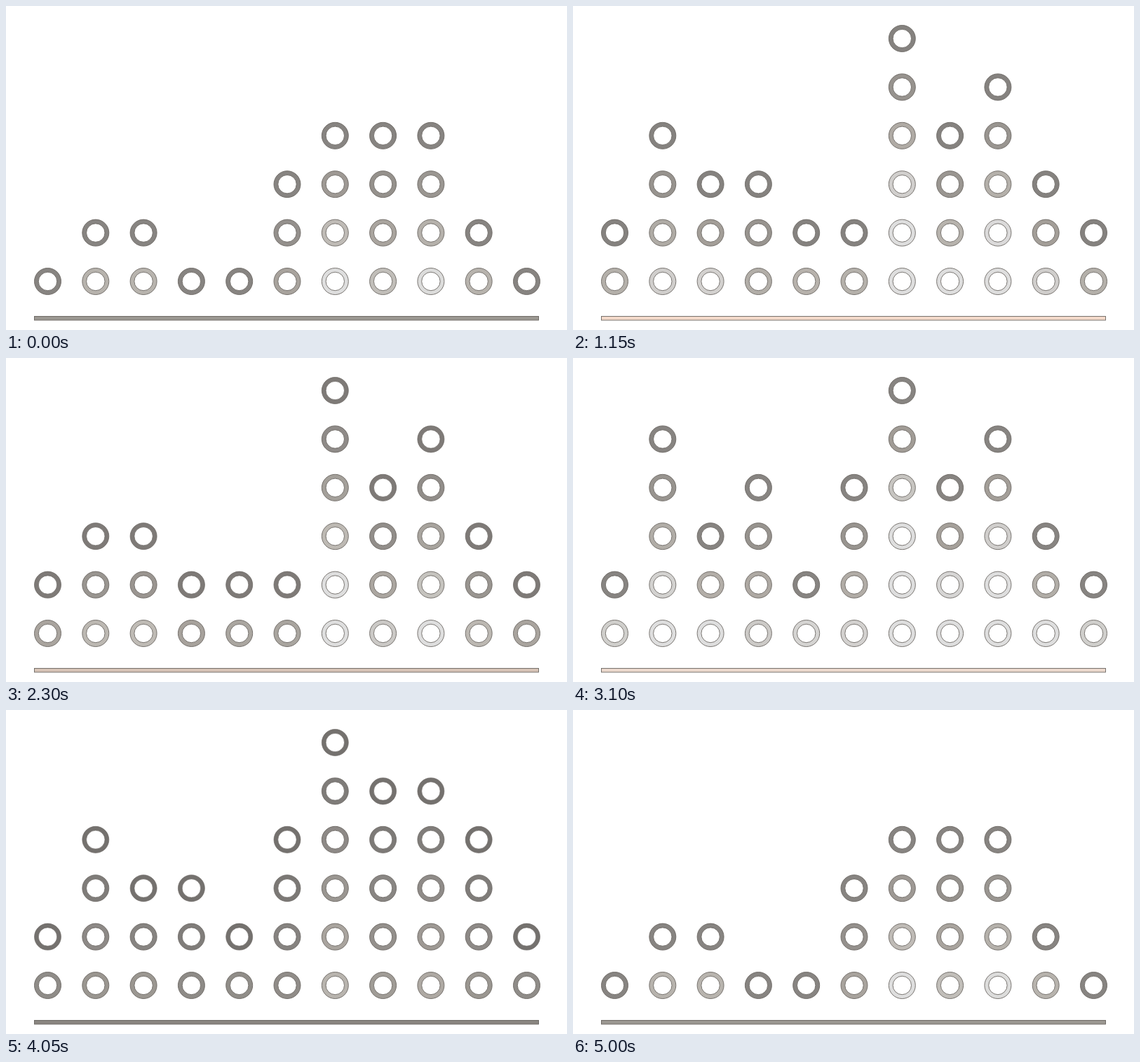
Recreate the animation shown at these times as an HTML page with a canvas. Size 800 by 463 pixels, loop 5.05 s.

```html
<!DOCTYPE html>
<html lang="en">
<head>
<meta charset="utf-8">
<title>Ring meter</title>
<style>
  html, body { margin: 0; width: 100%; height: 100%; overflow: hidden; background: #fff; }
  canvas { display: block; }
</style>
</head>
<body>
<canvas id="stage" width="800" height="463"></canvas>
<script>
const ctx = document.getElementById("stage").getContext("2d");
const LOOP = 5050, STEP = 50, RESET = 5000;
const OUTLINE = "#6b6763";

// Evenly spaced colour stops, from spent to fully lit.
const RING_RAMP = [[97, 93, 90], [135, 132, 129], [162, 157, 151], [188, 184, 178], [222, 222, 222]];
const BAR_RAMP = [[120, 116, 112], [156, 152, 146], [215, 196, 183], [236, 217, 205], [252, 219, 198]];

// Resting spectrum, in rings per column.
const SPECTRUM = [2, 3, 3.1, 1.9, 2.1, 2.05, 5.9, 3.6, 4.9, 3, 2];

// swell shifts every column; the kick is a bump around centre that lifts odd
// columns and presses even ones. tone is the level of the top rings, glow the
// gain towards the bottom, bar the level of the base line.
const moods = [
  { at: 0,     swell: -0.9, centre: 5.5, width: 2.1, kick: 1.7,  tone: 1,    glow: 0.6,  bar: 1 },
  { at: 650,   swell: 0,    centre: 1.5, width: 3,   kick: 2,    tone: 1,    glow: 0.9,  bar: 3 },
  { at: 1700,  swell: 0,    centre: 1.5, width: 3,   kick: 0,    tone: 0.9,  glow: 0.85, bar: 4 },
  { at: 2300,  swell: 0,    centre: 3,   width: 3,   kick: 0,    tone: 0.75, glow: 0.75, bar: 2 },
  { at: 3100,  swell: 0.25, centre: 3,   width: 3,   kick: 2.3,  tone: 1,    glow: 1.3,  bar: 3 },
  { at: 4050,  swell: 0.25, centre: 5,   width: 6,   kick: 1.45, tone: 0.5,  glow: 0.4,  bar: 0.5 },
  { at: RESET, swell: 0.25, centre: 5,   width: 6,   kick: 1.45, tone: 0.2,  glow: 0.15, bar: 0 }
];

const mix = (a, b, p) => a + (b - a) * p;

function shade(ramp, level) {
  const x = Math.min(Math.max(level, 0), ramp.length - 1);
  const i = Math.min(Math.floor(x), ramp.length - 2);
  return `rgb(${ramp[i].map((v, k) => Math.round(mix(v, ramp[i + 1][k], x - i)))})`;
}

function moodAt(time) {
  const i = moods.findIndex(m => m.at > time);
  const a = moods[i - 1], b = moods[i];
  const p = (time - a.at) / (b.at - a.at);
  return Object.fromEntries(Object.keys(a).map(key => [key, mix(a[key], b[key], p)]));
}

function ringCount(col, mood) {
  const bump = Math.exp(-(((col - mood.centre) / mood.width) ** 2));
  const side = col % 2 ? 1 : -0.35;
  return Math.round(SPECTRUM[col] + mood.swell + mood.kick * bump * side);
}

function drawRing(col, row, level) {
  const x = 59.5 + col * 68.3, y = 393.5 - row * 69.4;
  ctx.beginPath();
  ctx.arc(x, y, 19, 0, Math.PI * 2);
  ctx.moveTo(x + 13.2, y);
  ctx.arc(x, y, 13.2, 0, Math.PI * 2, true);
  ctx.fillStyle = shade(RING_RAMP, level);
  ctx.fill();
  ctx.lineWidth = 0.4 + 0.5 * Math.min(1, level);
  ctx.stroke();
}

function draw(time) {
  const mood = moodAt(time);
  ctx.fillStyle = "#fff";
  ctx.fillRect(0, 0, 800, 463);
  ctx.strokeStyle = OUTLINE;

  SPECTRUM.forEach((rest, col) => {
    const count = ringCount(col, mood);
    for (let row = 0; row < count; row++) {
      const depth = (count - 1 - row) / Math.max(1, count - 1);
      drawRing(col, row, mood.tone + mood.glow * rest * depth ** 1.3);
    }
  });

  ctx.fillStyle = shade(BAR_RAMP, mood.bar);
  ctx.fillRect(40, 443, 720, 6);
  ctx.lineWidth = 0.9;
  ctx.strokeRect(40.5, 443.5, 719, 5.5);
}

const start = performance.now();
function tick() {
  const elapsed = (performance.now() - start) % LOOP;
  const time = Math.floor(elapsed / STEP) * STEP;
  draw(time >= RESET ? 0 : time);
  requestAnimationFrame(tick);
}
tick();
</script>
</body>
</html>
```
